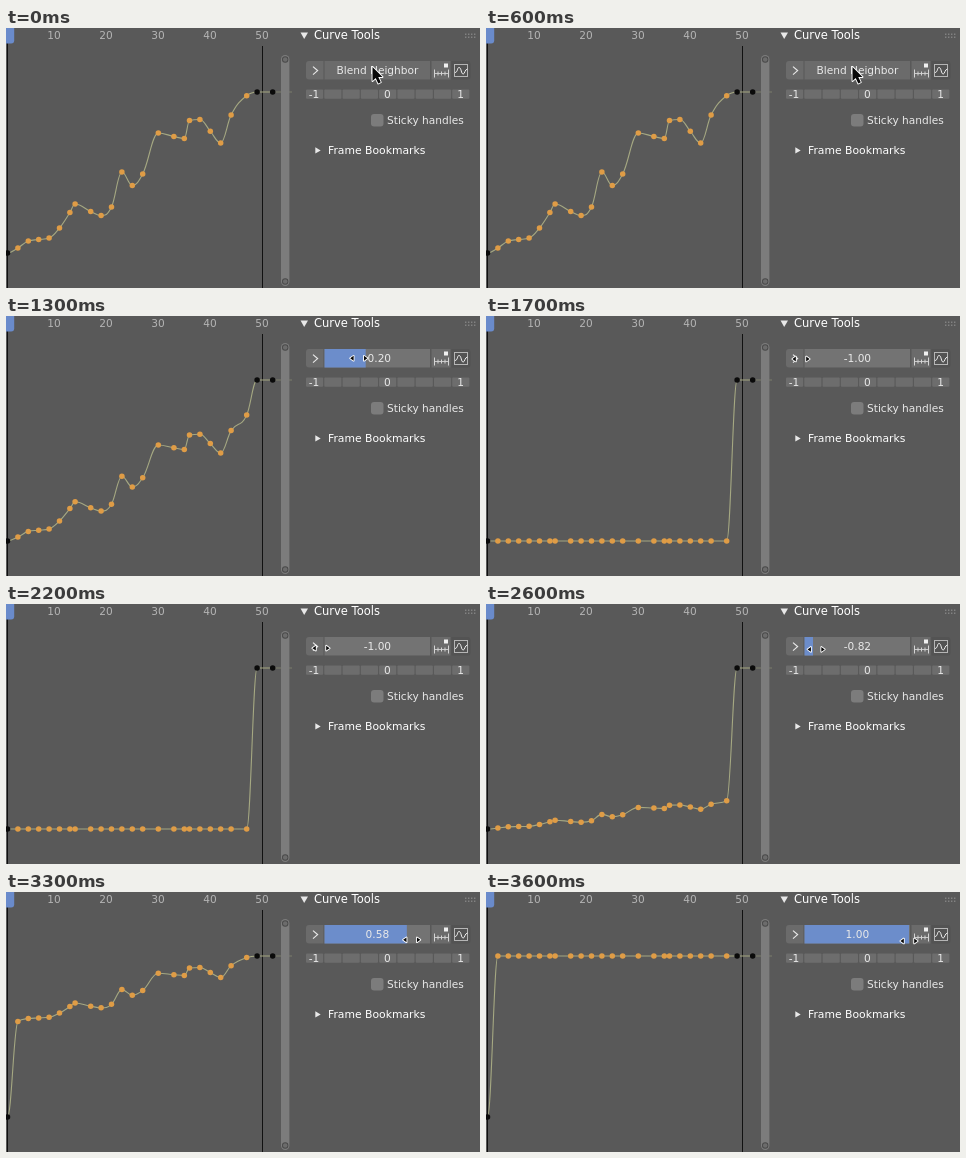
Write an HTML page with a canvas that moves like this. It is 474x260 px and loops after 3700 ms.

```html
<!DOCTYPE html>
<html lang="en">
<head>
<meta charset="utf-8">
<title>Curve blend slider</title>
<style>
html, body { margin: 0; width: 100%; height: 100%; overflow: hidden; background: #595959; }
canvas { display: block; width: 474px; height: 260px; }
</style>
</head>
<body>
<canvas id="stage"></canvas>
<script>
const W = 474, H = 260, LOOP = 3700, STEP = 100;
const canvas = document.getElementById('stage');
const ctx = canvas.getContext('2d');
const dpr = window.devicePixelRatio || 1;
canvas.width = W * dpr;
canvas.height = H * dpr;

const FONT = '"DejaVu Sans", sans-serif';
const BUTTON = '#6b6b6b', LIGHT = '#e8e8e8', BLUE = '#6c8dcb';
const LOW = 225, HIGH = 64;
const HANDLE = 0.39;

// Turns of the curve as [frame, height].
const TURNS = [
  [1, LOW], [5, 213], [9, 210], [13, 184.5], [14, 176], [19, 187.5],
  [21, 179], [23, 144], [25, 157.5], [27, 146], [30, 105], [35, 110.5],
  [36, 92.5], [38, 91.5], [42, 115], [44, 87], [49, HIGH], [52, HIGH]
];

// Clamped automatic tangent: flat at extremes and ends, never overshooting.
function slope(pts, i) {
  if (i === 0 || i === pts.length - 1) return 0;
  const [x0, y0] = pts[i - 1], [x1, y1] = pts[i], [x2, y2] = pts[i + 1];
  const a = (y1 - y0) / (x1 - x0), b = (y2 - y1) / (x2 - x1);
  if (a * b <= 0) return 0;
  return Math.sign(a) * Math.min(Math.abs(a + b) / 2, Math.abs(a) / HANDLE, Math.abs(b) / HANDLE);
}

// Every long gap between turns gets one more key near its middle.
function fillGaps(turns) {
  return turns.flatMap((turn, i) => {
    const next = turns[i + 1];
    const gap = next ? next[0] - turn[0] : 0;
    if (gap <= 3) return [turn];
    const step = Math.ceil(gap / 2), u = step / gap;
    const ease = u * u * (3 - 2 * u);
    const bend = gap * u * (1 - u) * (slope(turns, i) * (1 - u) - slope(turns, i + 1) * u);
    return [turn, [turn[0] + step, turn[1] + (next[1] - turn[1]) * ease + bend]];
  });
}

const KEYS = fillGaps(TURNS);
const isFixed = i => i === 0 || i >= KEYS.length - 2;
const frameX = f => -3.7 + 5.2 * f;

// One sweep left to -1, a rest, then one sweep right to 1 at the same speed.
const DRAG_START = 700, TURN_BACK = 2100, UNIT_MS = 500, LEAD = 50;
const clamp = (v, lo, hi) => Math.max(lo, Math.min(hi, v));
const valueAt = t => t < TURN_BACK
  ? clamp((1200 - t) / UNIT_MS, -1, 0)
  : clamp((t - 3010) / UNIT_MS, -1, 1);
const dragX = t => 369 + 54 * valueAt(t + LEAD);
const dragY = t => 42 + 7 * Math.max(0, (t - 1000) / 2600) ** 1.5;

function rect(x, y, w, h, fill, radius = 0) {
  ctx.fillStyle = fill;
  ctx.beginPath();
  ctx.roundRect(x, y, w, h, radius);
  ctx.fill();
}

function dot(x, y, r, fill) {
  ctx.fillStyle = fill;
  ctx.beginPath();
  ctx.arc(x, y, r, 0, Math.PI * 2);
  ctx.fill();
}

function path(points, close) {
  ctx.beginPath();
  points.forEach(([x, y]) => ctx.lineTo(x, y));
  if (close) ctx.closePath();
}

function line(points, color, width = 1) {
  path(points);
  ctx.strokeStyle = color;
  ctx.lineWidth = width;
  ctx.stroke();
}

function shape(points, fill) {
  path(points, true);
  ctx.fillStyle = fill;
  ctx.fill();
}

function label(text, x, y, align = 'left', color = LIGHT, size = 10.6) {
  ctx.font = `${size}px ${FONT}`;
  ctx.textAlign = align;
  ctx.fillStyle = color;
  ctx.fillText(text, x, y);
}

function drawCurve(value) {
  const goal = value < 0 ? LOW : HIGH;
  const pts = KEYS.map(([f, y], i) =>
    [frameX(f), isFixed(i) ? y : y + (goal - y) * Math.abs(value)]);
  line([pts[pts.length - 1], [286, HIGH]], 'rgba(165,168,130,0.45)');

  ctx.beginPath();
  ctx.moveTo(...pts[0]);
  for (let i = 1; i < pts.length; i++) {
    const [x0, y0] = pts[i - 1], [x1, y1] = pts[i];
    const h = (x1 - x0) * HANDLE;
    ctx.bezierCurveTo(x0 + h, y0 + slope(pts, i - 1) * h,
      x1 - h, y1 - slope(pts, i) * h, x1, y1);
  }
  ctx.strokeStyle = '#a5a882';
  ctx.lineWidth = 1.1;
  ctx.stroke();
  pts.forEach(([x, y], i) => dot(x, y, 2.75, isFixed(i) ? '#0a0a0a' : '#df9c46'));
}

function drawGraph(value) {
  for (let f = 10; f <= 50; f += 10) label(f, frameX(f) - 0.3, 11.3, 'center', '#b4b4b4');
  rect(1, 15, 1, H - 15, '#111');
  rect(256, 18, 1, H - 18, '#111');
  rect(-7, -4, 15.2, 19.5, '#6a8bcb', 3);
  drawCurve(value);
  rect(275, 27, 8.4, 231, '#7c7c7c', 4.2);
  for (const y of [31.5, 253.5]) {
    dot(279.2, y, 3.2, '#484848');
    dot(279.2, y, 2.3, '#6c6c6c');
  }
}

function drawIcons() {
  rect(425.5, 33, 19, 18.5, BUTTON);
  line([[428, 45.5], [442.5, 45.5]], '#c8c8c8');
  for (let i = 0; i < 5; i++) {
    const x = 428.5 + i * 3.5, reach = i % 4 ? 2 : 4;
    line([[x, 45.5 - reach], [x, 45.5 + reach]], '#d4d4d4');
  }
  rect(438, 35.5, 4, 4, '#f0f0f0');

  rect(445.5, 33, 19, 18.5, '#535353', [0, 3, 3, 0]);
  ctx.strokeStyle = '#b5b5b5';
  ctx.lineWidth = 1;
  ctx.strokeRect(448.5, 36.5, 13, 12);
  ctx.beginPath();
  ctx.moveTo(449, 44.5);
  ctx.bezierCurveTo(452, 44.5, 451, 39, 453.3, 39.5);
  ctx.bezierCurveTo(455.5, 40, 455, 46, 457.2, 46);
  ctx.bezierCurveTo(459, 46, 458.5, 41.5, 461.5, 41);
  ctx.strokeStyle = '#f0f0f0';
  ctx.stroke();
}

function drawSlider(value, dragging) {
  const x = 318.5, y = 33, w = 105.5, h = 18.5;
  rect(x, y, w, h, dragging ? '#737373' : BUTTON);
  if (dragging) rect(x, y, Math.max(0, w * (value + 1) / 2 - 1), h, BLUE);
  label(dragging ? value.toFixed(2) : 'Blend Neighbor', 371.4, 46.2, 'center');
}

function drawPanel(value, dragging) {
  shape([[294.5, 4.5], [302, 4.5], [298.2, 11]], LIGHT);
  label('Curve Tools', 308, 11.4, 'left', '#fff', 11.5);
  for (let i = 0; i < 8; i++) rect(459 + (i % 4) * 3, 5.5 + (i >> 2) * 3, 1.4, 1.4, '#828282');

  rect(300, 33, 17.5, 18.5, BUTTON, [3, 0, 0, 3]);
  line([[307, 38.6], [311.6, 42.6], [307, 46.6]], LIGHT, 1.2);
  drawSlider(value, dragging);
  drawIcons();

  const cell = 164.5 / 9;
  for (let i = 0; i < 9; i++) rect(300 + i * cell, 61.5, cell - 1.1, 9.3, '#6d6d6d', 1);
  ['-1', '0', '1'].forEach((s, i) => label(s, 308 + i * 73.3, 69.8, 'center'));

  rect(365, 86, 12.5, 12.5, '#7c7c7c', 3);
  label('Sticky handles', 381, 96.2);
  shape([[309.3, 119.3], [314.7, 122.4], [309.3, 125.5]], LIGHT);
  label('Frame Bookmarks', 322, 126.2, 'left', '#fff', 10.8);
}

function outlined(points, width) {
  path(points, true);
  ctx.lineJoin = 'round';
  ctx.lineWidth = width;
  ctx.strokeStyle = '#fff';
  ctx.stroke();
  ctx.lineJoin = 'miter';
  ctx.fillStyle = '#080808';
  ctx.fill();
}

function drawPointer(x, y) {
  const arrow = [[0, 0], [0, 14], [3.2, 11], [5.8, 16.5], [8.3, 15.3], [5.8, 10], [10, 10]];
  outlined(arrow.map(([dx, dy]) => [x + dx, y + dy]), 1.8);
}

function drawDragCursor(x, y) {
  for (const side of [-1, 1]) {
    const cx = x + side * 6.5;
    outlined([[cx + side * 2.1, y], [cx - side * 1.3, y - 2.4], [cx - side * 1.3, y + 2.4]], 1.8);
  }
}

function render(time) {
  const t = Math.floor((time % LOOP) / STEP) * STEP;
  const dragging = t >= DRAG_START;
  const value = valueAt(t);
  ctx.setTransform(dpr, 0, 0, dpr, 0, 0);
  ctx.fillStyle = '#595959';
  ctx.fillRect(0, 0, W, H);
  drawGraph(value);
  drawPanel(value, dragging);
  if (dragging) drawDragCursor(dragX(t), dragY(t));
  else drawPointer(366.5, 39);
}

const start = performance.now();
function tick() {
  render(performance.now() - start);
  requestAnimationFrame(tick);
}
tick();
</script>
</body>
</html>
```
